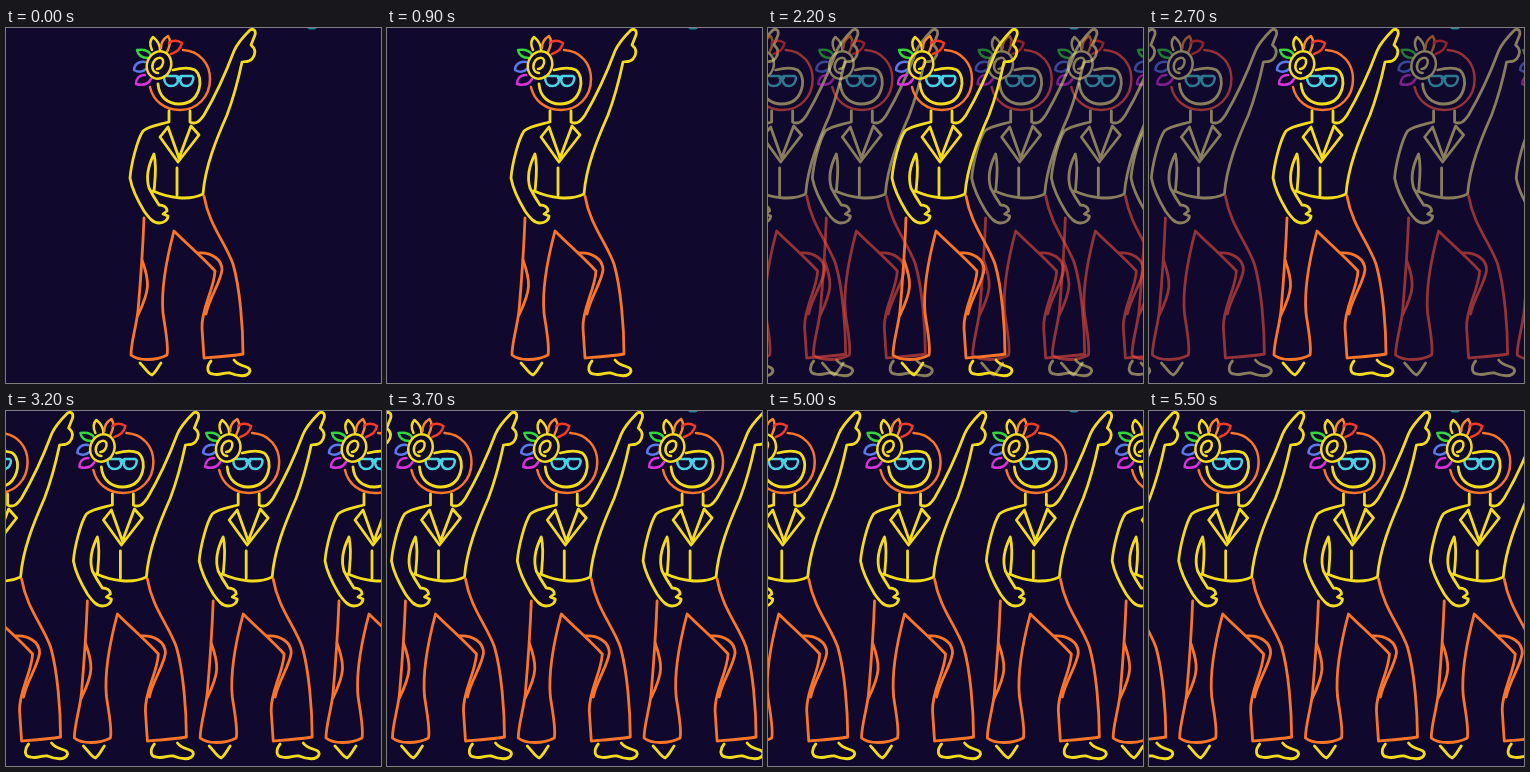
An HTML page for the animation above (5600 ms loop, 375 by 355 pixels).

```html
<!DOCTYPE html>
<html lang="en">
<head>
<meta charset="utf-8">
<title>Neon disco dancer</title>
<style>
  html, body { margin: 0; width: 100%; height: 100%; overflow: hidden; background: #10092d; }
  svg { display: block; width: 100vw; height: 100vh; }
  use { --y: #f3dc1e; --p: #f9752a; }
  .echo { --y: #eadf86; --p: #ff5440; opacity: .55; }
  #dancer { fill: none; stroke-width: 2.8; stroke-linecap: round; stroke-linejoin: round; }
  .y { stroke: var(--y); }
  .p { stroke: var(--p); }
</style>
</head>
<body>
<svg viewBox="0 0 375 355" preserveAspectRatio="none">
  <defs>
    <g id="dancer">
      <!-- hair, face, glasses -->
      <path class="p" stroke-width="2.5" d="M177 22C194 23 204 36 204 51C204 69 191 82 174 82C159 82 147 73 144 59"/>
      <path class="y" d="M167 42C175 40 183 39 189 42C194 46 195 54 193 61C190 71 183 76 173 76C162 76 153 69 152 56"/>
      <path stroke="#48d2e4" stroke-width="2.5" d="M159 48H170Q172 48 172 51C172 56 169 58 165 58C161 58 158 55 158 49ZM175 48H186Q188 49 187 52C186 56 184 58 180 58C176 58 174 55 174 50ZM171 50Q173 48 175 50"/>
      <!-- flower -->
      <g stroke-width="2.5">
        <path class="y" d="M146 22C143 16 144 12 147 9C152 13 154 17 154 22"/>
        <path stroke="#f58a28" d="M155 20C155 14 157 11 162 8C165 12 164 18 161 24"/>
        <path stroke="#f23a28" d="M163 15C167 12 171 12 176 15C175 20 171 24 165 26"/>
        <path stroke="#35d43c" d="M142 30C135 30 132 27 131 22C138 21 143 23 145 27"/>
        <path stroke="#5a78ec" d="M139 34C132 33 128 37 128 42C133 45 137 44 140 41"/>
        <path stroke="#d832d8" d="M139 47C133 47 130 51 130 56C137 58 142 56 145 51"/>
        <ellipse class="y" cx="153" cy="37" rx="12" ry="14" transform="rotate(20 153 37)"/>
        <path class="y" d="M151 41C155 41 158 36 157 32C155 28 149 30 147 35C145 41 148 45 152 45"/>
      </g>
      <!-- left arm and hand -->
      <path class="y" d="M163 83V94C152 97 143 98 137 103C131 112 125 137 124 150C126 161 132 173 138 183C143 190 147 195 153 195C158 195 162 192 162 188L157 186L161 183C161 179 157 177 153 177C149 171 146 166 143 160C139 147 143 136 148 126C151 139 149 152 148 163"/>
      <!-- raised arm, hem -->
      <path class="y" d="M184 83V94C190 97 194 93 198 87C208 70 219 47 228 23C231 16 239 7 244 2C248 0 250 3 249 7L245 17C250 21 250 26 246 31C242 35 239 33 236 34C232 53 227 71 221 87C210 112 199 139 197 166C183 173 163 170 147 163"/>
      <!-- collar, buttons -->
      <path class="y" d="M162 99L154 109L172 134L193 107L185 98L173 130ZM171 140V167"/>
      <!-- trousers -->
      <path class="p" d="M138 190C137 217 135 248 132 283C130 300 125 314 125 327C132 333 150 333 161 327C163 318 159 300 157 285C155 262 160 233 168 203C181 216 197 230 209 243C208 262 195 281 196 300L198 330C211 329 226 328 237 326C237 300 234 260 227 236C219 214 203 197 198 168"/>
      <path class="p" d="M192 225C205 224 216 231 216 242C214 256 203 270 200 286M136 232C144 254 144 262 132 287"/>
      <!-- shoes -->
      <path class="y" d="M134 335C139 340 142 346 146 347C150 344 152 339 155 335M205 333C200 339 201 346 207 346C214 348 218 344 224 345C231 348 242 350 244 343C244 337 234 340 228 332"/>
    </g>
  </defs>
  <rect width="375" height="355" fill="#10092d"/>
  <g id="row"></g>
  <ellipse id="dot" cx="306" cy="-1" rx="5" ry="2.5" fill="#237f93"/>
</svg>
<script>
  const LOOP = 5600, STEP = 100, SPREAD = 1250, SCROLL = 2750, GAP = 125.8, SIDE = 4;
  const row = document.getElementById('row');
  const dot = document.getElementById('dot');
  const copies = [];

  function addCopy(i) {
    const el = document.createElementNS('http://www.w3.org/2000/svg', 'use');
    el.setAttribute('href', '#dancer');
    row.append(el);
    copies.push({ i, el });
  }

  // outermost first, so the middle dancer lies on top
  for (let i = SIDE; i > 0; i--) { addCopy(-i); addCopy(i); }
  addCopy(0);

  function draw(t) {
    const scrolling = t >= SCROLL;
    const spread = Math.min(1, Math.max(0, (t - SPREAD) / (SCROLL - SPREAD)));
    const shift = scrolling ? -((t - SCROLL) / 1000 * GAP) % GAP : 0;
    for (const { i, el } of copies) {
      el.setAttribute('x', (i * spread * GAP + shift).toFixed(2));
      el.setAttribute('class', i && !scrolling ? 'echo' : '');
      el.style.display = i && !spread ? 'none' : '';
    }
    const phase = t % 1200;
    dot.style.display = phase >= 750 && phase < 900 ? 'none' : '';
  }

  const start = performance.now();
  function tick() {
    const t = (performance.now() - start) % LOOP;
    draw(Math.floor(t / STEP) * STEP);
    requestAnimationFrame(tick);
  }
  tick();
</script>
</body>
</html>
```
